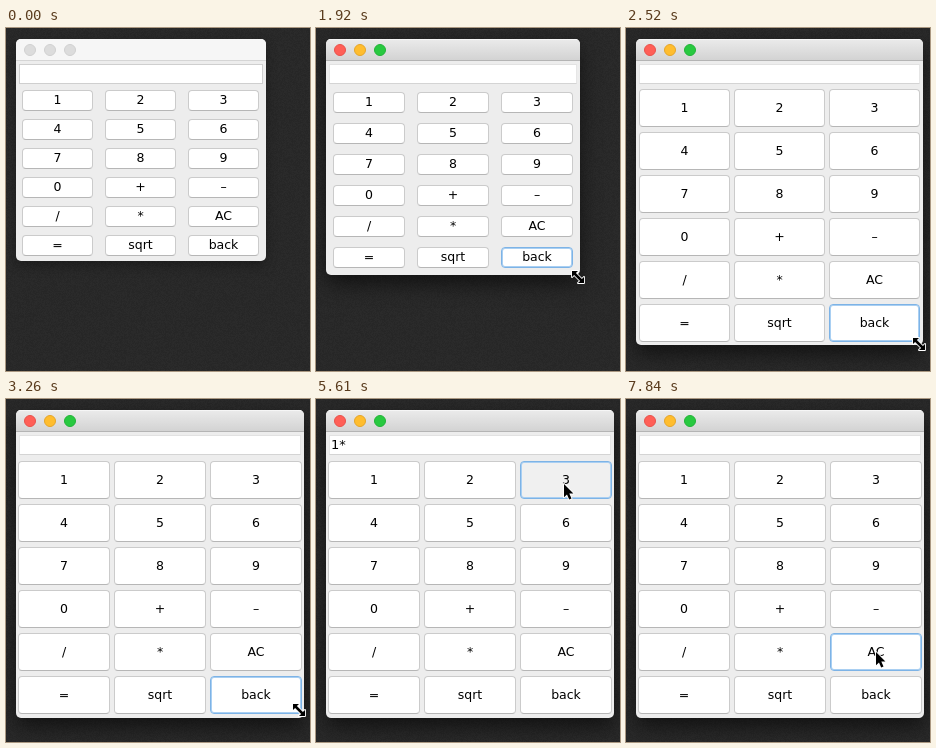
Animation, 304 px wide and 343 px high, one loop 8000 ms. Source, as an HTML page with a canvas:

```html
<!DOCTYPE html>
<html lang="en">
<head>
<meta charset="utf-8">
<title>Calculator</title>
<style>
  html, body { margin: 0; width: 100%; height: 100%; overflow: hidden; background: #292929; }
  body { position: relative; font: 12.5px "DejaVu Sans", sans-serif; color: #000; cursor: default; }
  #desk { position: absolute; left: 0; top: 0; }
  #win {
    position: absolute; left: 10px; top: 11px;
    background: #ededed; border-radius: 5px; overflow: hidden;
    box-shadow: 0 5px 12px rgba(0, 0, 0, .3);
  }
  #win.active { box-shadow: 0 9px 20px rgba(0, 0, 0, .55); }
  #bar {
    height: 21px; background: #f6f6f6; border-bottom: 1px solid #d5d5d5;
  }
  .active #bar {
    background: linear-gradient(#ebebeb, #d3d3d3); border-color: #b4b4b4;
    box-shadow: inset 0 1px #f6f6f6;
  }
  #bar i {
    position: absolute; top: 5px; width: 12px; height: 12px; box-sizing: border-box;
    border-radius: 50%; background: #dcdcdc; border: 1px solid #d0d0d0;
  }
  #bar i:nth-child(1) { left: 8px; }
  #bar i:nth-child(2) { left: 28px; }
  #bar i:nth-child(3) { left: 48px; }
  .active #bar i:nth-child(1) { background: #ff5f57; border-color: #e8514a; }
  .active #bar i:nth-child(2) { background: #ffbd2e; border-color: #e5a528; }
  .active #bar i:nth-child(3) { background: #28c940; border-color: #22b238; }
  #field {
    position: absolute; left: 3px; right: 3px; top: 25px; height: 20px; box-sizing: border-box;
    background: #fff; border: 1px solid #cfcfcf; padding-left: 1px;
    font-size: 13px; line-height: 18px; white-space: pre;
  }
  .active #field { border-color: #e2e2e2 #e6e6e6 #d4d4d4; }
  .key {
    position: absolute; box-sizing: border-box; text-align: center; white-space: pre;
    background: #fff; border: 1px solid #cbcbcb; border-bottom-color: #b6b6b6; border-radius: 4px;
  }
  .key.focus { border-color: #7db3e6; box-shadow: inset 0 0 0 1px #a9cff2; }
  .key.down { background: #f0f0f0; }
  svg { position: absolute; left: 0; top: 0; overflow: visible; }
  svg path { fill: #000; stroke: #fff; stroke-width: 1.8; stroke-linejoin: round; paint-order: stroke; }
</style>
</head>
<body>
<canvas id="desk" width="304" height="343"></canvas>
<div id="win">
  <div id="bar"><i></i><i></i><i></i></div>
  <div id="field"></div>
</div>
<svg id="arrow" width="12" height="18"><path d="M1 1V14.2L4 11.4L6.2 16.6L8.5 15.6L6.3 10.6H10.4Z"/></svg>
<svg id="grip" width="1" height="1"><path d="M-6 -6H0L-2.1 -3.9L3.9 2.1L6 0V6H0L2.1 3.9L-3.9 -2.1L-6 0Z"/></svg>
<script>
const LOOP = 8000;
const LABELS = ['1', '2', '3', '4', '5', '6', '7', '8', '9', '0', '+', '–', '/', '*', 'AC', '=', 'sqrt', 'back'];
const $ = id => document.getElementById(id);
const win = $('win'), field = $('field'), arrow = $('arrow'), grip = $('grip');

const keys = LABELS.map(label => {
  const key = document.createElement('div');
  key.textContent = label;
  win.append(key);
  return key;
});

// Each track holds [start time, value...] and keeps a value until the next start.
const SIZE = [
  [0, 250, 222], [1920, 254, 236], [2070, 264, 262], [2220, 275, 286],
  [2370, 283, 299], [2520, 287, 306], [2670, 288, 308]
];
const POINTER = [
  [0, null], [150, 'arrow', 275, 261], [300, 'arrow', 268, 247], [440, 'arrow', 262, 239],
  [590, 'grip', 259, 236], [1180, 'grip', 258, 237], [1920, 'grip', 262, 249],
  [2070, 'grip', 272, 275], [2220, 'grip', 281, 296], [2370, 'grip', 290, 311],
  [2520, 'grip', 293, 316], [2670, 'grip', 294, 317], [3260, 'grip', 293, 311],
  [3410, 'arrow', 268, 262], [3550, 'arrow', 205, 190], [3700, 'arrow', 132, 128],
  [3850, 'arrow', 82, 94], [3990, 'arrow', 62, 84],
  [4440, 'arrow', 76, 112], [4590, 'arrow', 126, 202], [4730, 'arrow', 160, 259],
  [5170, 'arrow', 176, 216], [5320, 'arrow', 222, 126], [5470, 'arrow', 247, 86],
  [5610, 'arrow', 247, 84], [5910, 'arrow', 205, 165], [6050, 'arrow', 110, 290],
  [6200, 'arrow', 66, 326], [6350, 'arrow', 62, 304],
  [7250, 'arrow', 96, 298], [7400, 'arrow', 190, 272], [7540, 'arrow', 249, 254],
  [7690, 'arrow', 249, 252]
];
const FOCUS = [[0, ''], [1180, 'back'], [4140, '1'], [4880, '*'], [5610, '3'], [6350, '='], [7690, 'AC']];
const DOWN = [
  [0, ''], [4140, '1'], [4290, ''], [4880, '*'], [5030, ''], [5610, '3'],
  [5760, ''], [6350, '='], [6500, ''], [7690, 'AC'], [7840, '']
];
const TEXT = [[0, ''], [4290, '1'], [5030, '1*'], [5760, '1*3'], [6500, '3'], [7840, '']];

const at = (track, t) => track.findLast(step => step[0] <= t).slice(1);

function layout(w, h) {
  win.style.width = w + 'px';
  win.style.height = h + 'px';
  const top = 47, cw = Math.floor(w / 3), ch = Math.floor((h - top) / 6);
  const left = Math.floor((w - cw * 3) / 2), first = top + Math.floor((h - top - ch * 6) / 2);
  const big = ch > 33;
  const dx = big ? 2 : 6, dy = big ? 3 : Math.floor((ch - 21) / 2);
  const kw = cw - 2 * dx, kh = big ? ch - 5 : 21;
  keys.forEach((key, i) => {
    Object.assign(key.style, {
      left: left + (i % 3) * cw + dx + 'px',
      top: first + Math.floor(i / 3) * ch + dy + 'px',
      width: kw + 'px', height: kh + 'px', lineHeight: kh - 3 + 'px'
    });
  });
}

function draw(t) {
  layout(...at(SIZE, t));
  win.className = t >= 1030 ? 'active' : '';
  field.textContent = at(TEXT, t)[0];
  const focus = at(FOCUS, t)[0], down = at(DOWN, t)[0];
  keys.forEach((key, i) => {
    key.className = 'key' + (LABELS[i] === focus ? ' focus' : '') + (LABELS[i] === down ? ' down' : '');
  });
  const [kind, x, y] = at(POINTER, t);
  for (const el of [arrow, grip]) {
    el.style.display = el.id === kind ? 'block' : 'none';
    if (el.id === kind) el.style.transform = `translate(${x}px, ${y}px)`;
  }
}

// Faint grain of the desktop
function paintDesk() {
  const ctx = $('desk').getContext('2d');
  const img = ctx.createImageData(304, 343);
  let seed = 7;
  for (let i = 0; i < img.data.length; i += 4) {
    seed = (seed * 1664525 + 1013904223) % 4294967296;
    img.data.fill(38 + Math.floor(seed / 4294967296 * 6), i, i + 3);
    img.data[i + 3] = 255;
  }
  ctx.putImageData(img, 0, 0);
}

paintDesk();
const start = performance.now();
function tick() {
  draw((performance.now() - start) % LOOP);
  requestAnimationFrame(tick);
}
tick();
</script>
</body>
</html>
```
